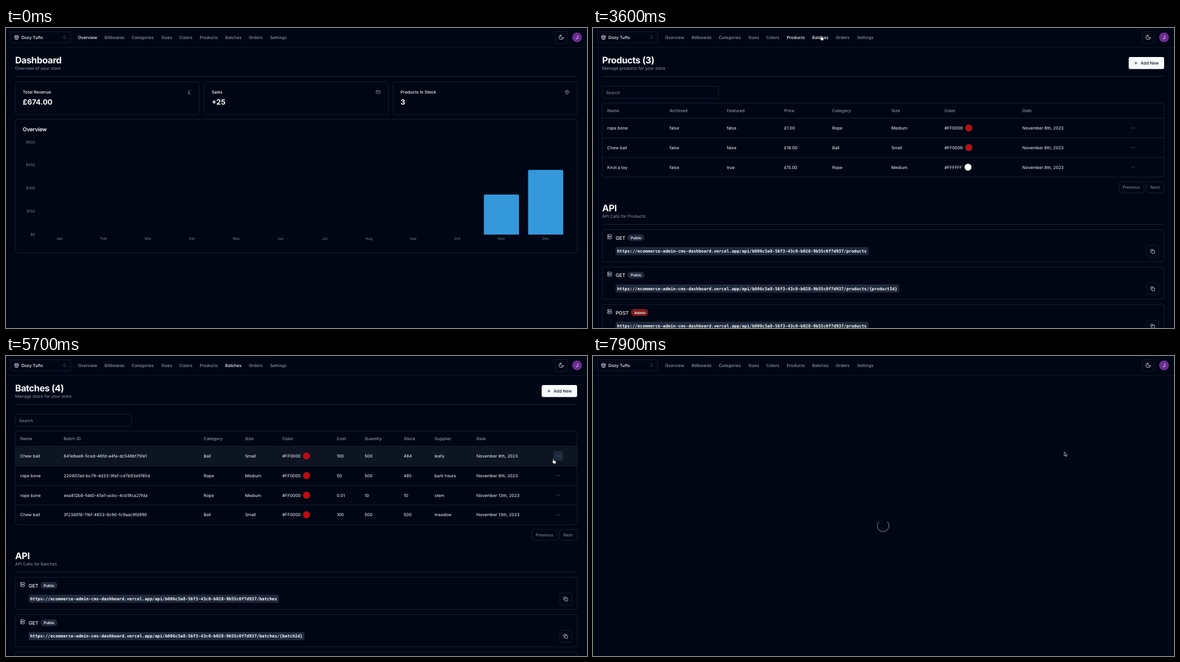
An HTML page for the animation above (8 s loop, 1000 by 517 pixels).

```html
<!DOCTYPE html>
<html lang="en">
<head>
<meta charset="utf-8">
<title>Store admin dashboard</title>
<style>
  html, body { margin: 0; width: 100%; height: 100%; overflow: hidden; background: #010615; }
  svg { display: block; width: 100%; height: 100%; }
  text { font-family: Inter, "Liberation Sans", sans-serif; text-rendering: geometricPrecision; white-space: pre; }
  .code { font-family: "DejaVu Sans Mono", "Liberation Mono", monospace; }
</style>
</head>
<body>
<svg id="stage" viewBox="0 0 1000 517"></svg>
<script>
const LOOP = 8000;
const BG = '#010615', WHITE = '#f8fafc', MUTED = '#8a97ab', LINE = '#1e293b', FADED = '#787f8d';
const css = [];

// ---------- timeline helpers ----------
function track(name, prop, points, ease = 'step-end') {
  const all = [...points, [LOOP, points[points.length - 1][1]]];
  const keys = all.map(([ms, v]) => `${ms / LOOP * 100}%{${prop}:${v}}`).join('');
  css.push(`@keyframes ${name}{${keys}} .${name}{animation:${name} ${LOOP}ms ${ease} infinite}`);
}
function show(name, ...spans) {
  track(name, 'opacity', [[0, 0], ...spans.flatMap(([a, b]) => b < LOOP ? [[a, 1], [b, 0]] : [[a, 1]])]);
}
const group = (cls, ...parts) => `<g class="${cls}">${parts.join('')}</g>`;

// ---------- drawing helpers ----------
const text = (x, y, s, { size = 7.29, weight = 400, fill = WHITE, extra = '' } = {}) =>
  `<text x="${x}" y="${y}" font-size="${size}" font-weight="${weight}" fill="${fill}" ${extra}>${s}</text>`;
const fillBox = (x, y, w, h, fill, r = 0, extra = '') =>
  `<rect x="${x}" y="${y}" width="${w}" height="${h}" rx="${r}" fill="${fill}" ${extra}/>`;
const frame = (x, y, w, h, r = 4, fill = 'none') =>
  `<rect x="${x}" y="${y}" width="${w}" height="${h}" rx="${r}" fill="${fill}" stroke="${LINE}" stroke-width=".7"/>`;
const rule = (y, x1 = 16, x2 = 983) =>
  `<path d="M${x1} ${y}H${x2}" stroke="${LINE}" stroke-width=".75"/>`;
const heading = (y, title, sub) =>
  text(15.7, y, title, { size: 15.63, weight: 700, extra: 'letter-spacing="-.39"' }) +
  text(15.7, y + 11.5, sub, { fill: MUTED }) + rule(y + 22.7);

const ICONS = {
  store: 'm2 7 4.4-4.4A2 2 0 0 1 7.8 2h8.4a2 2 0 0 1 1.4.6L22 7M4 12v8a2 2 0 0 0 2 2h12a2 2 0 0 0 2-2v-8M15 22v-4a2 2 0 0 0-2-2h-2a2 2 0 0 0-2 2v4M2 7h20v3a2.5 2.5 0 0 1-5 0 2.5 2.5 0 0 1-5 0 2.5 2.5 0 0 1-5 0 2.5 2.5 0 0 1-5 0z',
  updown: 'm7 15 5 5 5-5M7 9l5-5 5 5',
  moon: 'M12 3a6 6 0 0 0 9 9 9 9 0 1 1-9-9Z',
  pound: 'M18 7c0-5.3-8-5.3-8 0v14M6 21h12M6 13h10',
  card: 'M4 5h16a2 2 0 0 1 2 2v10a2 2 0 0 1-2 2H4a2 2 0 0 1-2-2V7a2 2 0 0 1 2-2ZM2 10h20',
  parcel: 'm7.5 4.3 9 5.1M21 8a2 2 0 0 0-1-1.7l-7-4a2 2 0 0 0-2 0l-7 4A2 2 0 0 0 3 8v8a2 2 0 0 0 1 1.7l7 4a2 2 0 0 0 2 0l7-4a2 2 0 0 0 1-1.7ZM3.3 7l8.7 5 8.7-5M12 22V12',
  plus: 'M5 12h14M12 5v14',
  server: 'M4 2h16a2 2 0 0 1 2 2v4a2 2 0 0 1-2 2H4a2 2 0 0 1-2-2V4a2 2 0 0 1 2-2ZM4 14h16a2 2 0 0 1 2 2v4a2 2 0 0 1-2 2H4a2 2 0 0 1-2-2v-4a2 2 0 0 1 2-2ZM6 6h.01M6 18h.01',
  copy: 'M10 8h10a2 2 0 0 1 2 2v10a2 2 0 0 1-2 2H10a2 2 0 0 1-2-2V10a2 2 0 0 1 2-2ZM4 16a2 2 0 0 1-2-2V4a2 2 0 0 1 2-2h10a2 2 0 0 1 2 2',
  edit: 'M11 4H4a2 2 0 0 0-2 2v14a2 2 0 0 0 2 2h14a2 2 0 0 0 2-2v-7M18.5 2.5a2.1 2.1 0 0 1 3 3L12 15l-4 1 1-4Z',
  trash: 'M3 6h18M19 6v14a2 2 0 0 1-2 2H7a2 2 0 0 1-2-2V6M8 6V4a2 2 0 0 1 2-2h4a2 2 0 0 1 2 2v2',
  dots: 'M5 12h.01M12 12h.01M19 12h.01'
};
function icon(name, cx, cy, color = WHITE, size = 8.33) {
  const k = size / 24;
  return `<path transform="translate(${cx - size / 2} ${cy - size / 2}) scale(${k})" d="${ICONS[name]}" fill="none"
    stroke="${color}" stroke-width="2" stroke-linecap="round" stroke-linejoin="round"/>`;
}

// ---------- header ----------
const NAV = [['Overview', 124], ['Billboards', 169.7], ['Categories', 216.5], ['Sizes', 267.3], ['Colors', 298.3],
  ['Products', 333.4], ['Batches', 377.3], ['Orders', 418], ['Settings', 454.4]];

function header() {
  const links = NAV.map(([label, x]) =>
    text(x, 18.7, label, { weight: 500, fill: MUTED, extra: `class="nav${label}"` }));
  return frame(7.7, 6.7, 103.8, 18.8, 3) + icon('store', 18.2, 16) +
    text(26.4, 18.7, 'Dozy Tufts', { weight: 500 }) + icon('updown', 100.8, 16, FADED) +
    links.join('') + `<path d="M0 33.4H1000" stroke="${LINE}" stroke-width=".5"/>` +
    frame(945.4, 5.8, 20.6, 20.6, 3) + icon('moon', 955.6, 16, WHITE, 10) +
    '<circle cx="982.8" cy="16.2" r="8.4" fill="#6a2c91"/>' +
    text(982.8, 19.2, 'J', { size: 8.4, extra: 'text-anchor="middle"' });
}

// ---------- dashboard ----------
function dashboard() {
  const cards = [['Total Revenue', '£674.00', 'pound'], ['Sales', '+25', 'card'], ['Products In Stock', '3', 'parcel']];
  const stats = cards.map(([label, value, ic], i) => {
    const x = 16 + i * 325.2;
    return frame(x, 92.6, 316.8, 56.8) + text(x + 12.7, 113, label, { weight: 500 }) +
      text(x + 12.7, 132.2, value, { size: 12.5, weight: 700 }) + icon(ic, x + 299.4, 110.5, MUTED);
  });
  const axis = { size: 6.25, fill: '#7d8087' };
  const ticks = [0, 150, 300, 450, 600].map(v => text(50, Math.max(358.3 - v * .2675, 199.2), '$' + v, { ...axis, extra: 'text-anchor="end"' }));
  const months = 'Jan Feb Mar Apr May Jun Jul Aug Sep Oct Nov Dec'.split(' ')
    .map((m, i) => text(92.1 + i * 76.08, 365.2, m, { ...axis, extra: 'text-anchor="middle"' }));
  const bar = (x, y) => `<path d="M${x} 356V${y + 2}q0-2 2-2h56.5q2 0 2 2V356Z" fill="#3498db"/>`;
  return heading(60.8, 'Dashboard', 'Overview of your store') + stats.join('') + frame(16, 157.6, 967, 229.8) +
    text(28.7, 178.3, 'Overview', { size: 9.375, weight: 600, extra: 'letter-spacing="-.23"' }) +
    ticks.join('') + months.join('') + bar(822.5, 287) + bar(898.6, 244.5);
}

// ---------- list pages ----------
const API = 'https://ecommerce-admin-cms-dashboard.vercel.app/api/b006c5a8-56f3-43c0-b028-9b55c0f7d937/';

function endpoint(y, method, path) {
  const post = method === 'POST', bx = post ? 65.2 : 59.3;
  const url = API + path;
  return frame(16, y, 967, 55.4) + icon('server', 28.6, y + 12.4) +
    text(39, y + 17.2, method, { size: 8.33, weight: 500 }) +
    fillBox(bx, y + 8, post ? 30 : 29.2, 11.8, post ? '#7f1d1d' : LINE, 5.9) +
    text(bx + 5.7, y + 16.2, post ? 'Admin' : 'Public', { size: 6.25, weight: 600 }) +
    fillBox(39, y + 30, url.length * 4.389 + 5, 14, LINE, 2) +
    text(41.4, y + 39.6, url, { weight: 700, extra: 'class="code"' }) +
    frame(953, y + 27.2, 20.6, 20.6, 3) + icon('copy', 963.3, y + 37.5);
}

function listPage({ title, sub, noun, param, cols, rows, menuX, under = '' }) {
  const bottom = 155.5 + rows.length * 33.8;
  const head = cols.map(([label, x]) => text(x, 145.2, label, { weight: 500, fill: MUTED }));
  const body = rows.map((row, r) => {
    const y = 172.3 + r * 33.8;
    const cells = row.map((v, c) => {
      const x = cols[c][1];
      if (v[0] !== '#') return text(x, y + 2.6, v);
      const white = v === '#FFFFFF';
      return text(x, y + 2.6, v) + `<circle cx="${x + (white ? 40.5 : 41.8)}" cy="${y}" r="6.1" stroke="${LINE}" stroke-width=".5"
        ${white ? 'fill="#fff"' : `class="dot${noun}" fill="#b91114"`}/>`;
    });
    return (r ? rule(y - 16.8) : '') + cells.join('') + icon('dots', menuX, y);
  });
  const top = bottom + 90.6;
  return heading(60.8, title, sub) +
    fillBox(922, 50, 61, 20.8, WHITE, 3) + icon('plus', 934.4, 60.4, '#0f172a') +
    text(942.4, 63.1, 'Add New', { weight: 500, fill: '#0f172a' }) +
    frame(16, 100.4, 200, 20.6, 3) + text(22.4, 113.8, 'Search', { fill: MUTED }) +
    under + frame(16, 129.6, 967, bottom - 129.6, 3) + head.join('') + rule(155.5) + body.join('') +
    frame(905.2, bottom + 8.4, 43.2, 18.7, 3) + text(911.4, bottom + 20.4, 'Previous', { weight: 500, fill: FADED }) +
    frame(952.8, bottom + 8.4, 30.2, 18.7, 3) + text(959.2, bottom + 20.4, 'Next', { weight: 500, fill: FADED }) +
    heading(bottom + 58.9, 'API', 'API Calls for ' + title.split(' ')[0]) +
    endpoint(top, 'GET', noun) + endpoint(top + 64.4, 'GET', `${noun}/{${param}}`) +
    endpoint(top + 128.8, 'POST', noun);
}

const products = listPage({
  title: 'Products (3)', sub: 'Manage products for your store', noun: 'products', param: 'productId', menuX: 929.5,
  cols: [['Name', 24.6], ['Archived', 131.7], ['Featured', 230.2], ['Price', 329], ['Category', 411.7],
    ['Size', 513.4], ['Color', 605], ['Date', 739]],
  rows: [
    ['rope bone', 'false', 'false', '£1.00', 'Rope', 'Medium', '#FF0000', 'November 8th, 2023'],
    ['Chew ball', 'false', 'false', '£18.00', 'Ball', 'Small', '#FF0000', 'November 8th, 2023'],
    ['Knot a toy', 'false', 'true', '£15.00', 'Rope', 'Medium', '#FFFFFF', 'November 8th, 2023']
  ]
});

const batches = listPage({
  title: 'Batches (4)', sub: 'Manage stock for your store', noun: 'batches', param: 'batchId', menuX: 950.5,
  cols: [['Name', 24.6], ['Batch ID', 99.3], ['Category', 340.3], ['Size', 411.4], ['Color', 475.5], ['Cost', 569.3],
    ['Quantity', 617.3], ['Stock', 684.5], ['Supplier', 737.6], ['Date', 809.8]],
  rows: [
    ['Chew ball', '641e8ae6-5ced-46fd-a4fa-dc548bf75fe1', 'Ball', 'Small', '#FF0000', '100', '500', '484', 'leafy', 'November 8th, 2023'],
    ['rope bone', '220407ad-bc79-4d33-9fa1-cd7b93e5f85d', 'Rope', 'Medium', '#FF0000', '50', '500', '485', 'bark hours', 'November 8th, 2023'],
    ['rope bone', 'eea812b8-fdd0-45e1-acbc-4cb19ca27fda', 'Rope', 'Medium', '#FF0000', '0.01', '10', '10', 'stem', 'November 13th, 2023'],
    ['Chew ball', '3f23d016-11bf-4653-8c90-fc9aac9fd990', 'Ball', 'Small', '#FF0000', '100', '500', '500', 'meadow', 'November 13th, 2023']
  ],
  under: group('rowHover', fillBox(16, 155.8, 967, 33.2, '#0d1523')) +
    group('dotsHover', fillBox(942.2, 164, 16.7, 16.7, LINE, 3))
});

function menu() {
  const items = [['Copy Id', 'copy'], ['Update', 'edit'], ['Delete', 'trash']];
  return frame(893.6, 183, 64.8, 70, 3, BG) + text(899, 196.3, 'Actions', { weight: 600 }) +
    fillBox(896, 202, 60, 16.5, '#182232', 2, 'class="hoverCopy"') +
    fillBox(896, 218.6, 60, 16.5, '#182232', 2, 'class="hoverUpdate"') +
    items.map(([label, ic], i) =>
      icon(ic, 903.2, 210.3 + i * 16.6) + text(911.3, 212.9 + i * 16.6, label)).join('');
}

// ---------- loader and pointer ----------
const loader = `<g transform="translate(499.4 292.6)"><path class="spin" d="M8.84 8.84A12.5 12.5 0 1 0 -8.84 8.84"
  transform="rotate(0)" fill="none" stroke="#a3a6c8" stroke-width="1.1"/></g>`;
const arrow = `<path d="M0 0V7.2L1.7 5.7 2.8 8.2 3.9 7.7 2.8 5.3H5Z" fill="#05070d" stroke="#e8eaee" stroke-width=".7" stroke-linejoin="round"/>`;
const hand = `<path d="M.3 1Q1 -.2 1.7 1V3.4L4.8 4Q5.6 4.3 5.5 5.4L5 8.4H1.6L-.9 5.4Q-.9 4.2 .3 4.7Z" fill="#fff" stroke="#05070d" stroke-width=".4"/>`;

// ---------- timing ----------
show('onDashboard', [0, 3000]);
show('onProducts', [3300, 3900]);
show('onBatches', [4200, 7600]);
show('loading', [3000, 3300], [3900, 4200], [7600, LOOP]);
track('navOverview', 'fill', [[0, WHITE], [3000, MUTED]]);
track('navProducts', 'fill', [[0, MUTED], [2050, WHITE], [3900, MUTED]]);
track('navBatches', 'fill', [[0, MUTED], [3480, WHITE], [7600, MUTED]]);
track('dotbatches', 'fill', [[0, '#e60a0d'], [4400, '#e60a0d'], [5700, '#c00c10'], [6700, '#980a10']], 'linear');

show('rowHover', [5000, 5900]);
show('dotsHover', [5600, 5900]);
track('menuOpen', 'opacity', [[0, 0], [5900, 0], [6050, 1], [7100, 1], [7200, 0]], 'linear');
track('hoverCopy', 'opacity', [[0, 0], [6550, 0], [6600, 1], [6680, 1], [6800, 0]], 'linear');
track('hoverUpdate', 'opacity', [[0, 0], [6600, 0], [6700, .85], [6800, 1]], 'linear');

const turn = (deg, k) => `rotate(${deg}deg) scale(${k})`;
track('spin', 'transform', [[0, turn(0, 1)],
  ...[2950, 3850, 7525].flatMap(ms => [[ms, turn(0, 1)], [ms + 375, turn(180, .8)]]),
  [LOOP - 1, turn(228, .853)]], 'linear');

const at = (ms, x, y) => [ms, `translate(${x}px,${y}px)`];
track('pointer', 'transform', [at(0, 560, 470), at(1400, 560, 470), at(2150, 344.6, 18.2), at(3250, 344.6, 18.2),
  at(3560, 391.4, 12.8), at(4550, 391.4, 12.8), at(5100, 880, 166), at(5250, 880, 166), at(5650, 941, 177),
  at(5720, 941, 177), at(5850, 948, 173), at(6450, 948, 173), at(6670, 925.4, 220), at(6720, 925.4, 220),
  at(6900, 922, 227), at(7500, 922, 227), at(7860, 811.2, 165)], 'ease-in-out');
show('handOn', [2080, 3350], [3420, 4650], [5580, 5950]);
show('arrowOn', [1400, 2080], [3350, 3420], [4650, 5580], [5950, LOOP]);

document.head.appendChild(document.createElement('style')).textContent = css.join('\n');
document.getElementById('stage').innerHTML =
  fillBox(0, 0, 1000, 517, BG) +
  group('onDashboard', dashboard()) + group('onProducts', products) + group('onBatches', batches) +
  group('loading', loader) + header() + group('menuOpen', menu()) +
  group('pointer', group('arrowOn', arrow), group('handOn', hand));
</script>
</body>
</html>
```
